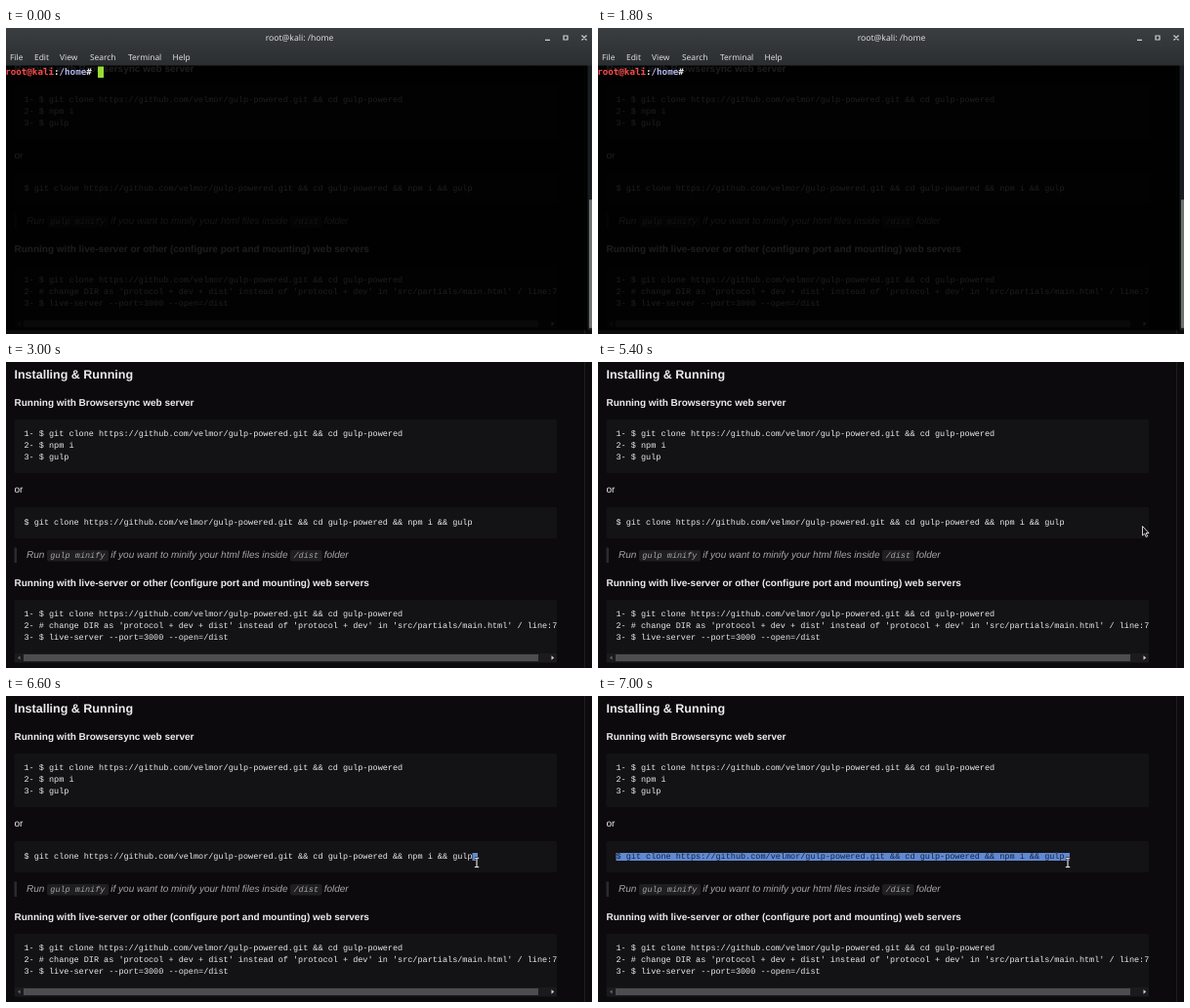
An HTML page that plays this animation: 600x314 px, repeating every 8 s.

```html
<!DOCTYPE html>
<html lang="en">
<head>
<meta charset="utf-8">
<title>Terminal and readme</title>
<style>
  html, body { margin: 0; width: 100%; height: 100%; overflow: hidden; background: #0c0a0d; }
  svg { display: block; }
  text { white-space: pre; text-rendering: geometricPrecision; fill: #ececec; }
  .page text { font: 10px "Liberation Sans", Arial, sans-serif; }
  .page .title { font-size: 12.5px; font-weight: bold; }
  .page .head { font-weight: bold; }
  .page .code { font: 8.5px "Liberation Mono", "Courier New", monospace; }
  .page .quote text { font-style: italic; fill: #a6a5a7; }
  .block { fill: #131214; }
  .chip { fill: #1f1e20; }
  .chrome text { font: 8.4px "Noto Sans", sans-serif; fill: #dcdcdc; }
  .prompt { font: bold 9.2px "DejaVu Sans Mono", monospace; }
</style>
</head>
<body>
<svg width="600" height="314" viewBox="0 0 600 314">
  <defs>
    <linearGradient id="bar" x2="0" y2="1">
      <stop stop-color="#3b3e40"/>
      <stop offset="1" stop-color="#2b2e30"/>
    </linearGradient>
  </defs>

  <g class="page">
    <rect width="600" height="314" fill="#0c0a0d"/>
    <path d="M592.5 0V314" stroke="#1d1d19"/>
    <text class="title" x="8.5" y="17">Installing &amp; Running</text>
    <text class="head" x="8.5" y="45">Running with Browsersync web server</text>
    <rect class="block" x="8.5" y="59" width="555.5" height="55" rx="1.5"/>
    <text class="code" x="18.5" y="76.3">1- $ git clone https://github.com/velmor/gulp-powered.git &amp;&amp; cd gulp-powered</text>
    <text class="code" x="18.5" y="88.3">2- $ npm i</text>
    <text class="code" x="18.5" y="100.3">3- $ gulp</text>
    <text x="8.5" y="134.3">or</text>
    <rect class="block" x="8.5" y="149" width="555.5" height="32" rx="1.5"/>
    <text class="code" x="18.5" y="167">$ git clone https://github.com/velmor/gulp-powered.git &amp;&amp; cd gulp-powered &amp;&amp; npm i &amp;&amp; gulp</text>

    <g class="quote">
      <rect x="8.5" y="190.5" width="2.5" height="15.5" fill="#2b2a2c"/>
      <rect class="chip" x="42" y="193" width="63" height="11.5" rx="2"/>
      <rect class="chip" x="291" y="193" width="32.5" height="11.5" rx="2"/>
      <text x="21" y="201.3">Run</text>
      <text class="code" x="45.3" y="201.3">gulp minify</text>
      <text x="107.3" y="201.3">if you want to minify your html files inside</text>
      <text class="code" x="294.5" y="201.3">/dist</text>
      <text x="325.7" y="201.3">folder</text>
    </g>

    <text class="head" x="8.5" y="230">Running with live-server or other (configure port and mounting) web servers</text>
    <rect class="block" x="8.5" y="244" width="555.5" height="65" rx="1.5"/>
    <svg width="564" height="314">
      <text class="code" x="18.5" y="261.3">1- $ git clone https://github.com/velmor/gulp-powered.git &amp;&amp; cd gulp-powered</text>
      <text class="code" x="18.5" y="273.3">2- # change DIR as 'protocol + dev + dist' instead of 'protocol + dev' in 'src/partials/main.html' / line:7</text>
      <text class="code" x="18.5" y="285.1">3- $ live-server --port=3000 --open=/dist</text>
    </svg>
    <rect x="9" y="299" width="555" height="9" fill="#1b1a1c"/>
    <rect x="18" y="300" width="527" height="7" fill="#4d4c4e"/>
    <path d="M14.5 301.5v4l-2.5-2z" fill="#69686a"/>
    <path d="M558.5 301.3v4.4l2.7-2.2z" fill="#d0d0d0"/>
  </g>

  <g id="selection">
    <rect id="highlight" y="161" height="8" fill="#6189d2"/>
    <svg id="selected" class="page" width="483" height="314">
      <text class="code" x="18.5" y="167" style="fill:#14233f">$ git clone https://github.com/velmor/gulp-powered.git &amp;&amp; cd gulp-powered &amp;&amp; npm i &amp;&amp; gulp</text>
    </svg>
  </g>

  <path id="arrow" d="M2.5.5V10L4.7 8.1 6.2 11.5 7.7 10.8 6.2 7.5H9z" fill="#111" stroke="#e8e8e8" stroke-width=".9"/>
  <g id="beam" fill="none">
    <path d="M-2.2 .8H2.2M0 .8V10M-2.2 10H2.2" stroke="#111" stroke-width="2.4"/>
    <path d="M-2.2 .8H2.2M0 .8V10M-2.2 10H2.2" stroke="#f0f0f0" stroke-width="1.1"/>
  </g>

  <g id="terminal">
    <rect y="38" width="600" height="272" opacity=".88"/>
    <rect x="595.5" y="38" width="4.5" height="272" fill="#1b1e20"/>
    <rect x="597" y="176" width="3" height="132" rx="1" fill="#707272"/>
    <rect width="600" height="38.5" fill="url(#bar)"/>
    <g class="chrome">
      <text x="300.5" y="13.2" text-anchor="middle" style="font-size:8.6px">root@kali: /home</text>
      <text x="4" y="32.8">File</text>
      <text x="29" y="32.8">Edit</text>
      <text x="55" y="32.8">View</text>
      <text x="86" y="32.8">Search</text>
      <text x="125" y="32.8">Terminal</text>
      <text x="170.5" y="32.8">Help</text>
      <path d="M552 12.3H557M571 8H575V12H571ZM589.5 7.5L594.5 12.5M594.5 7.5L589.5 12.5" fill="none" stroke="#d0d0d0" stroke-width="1.2"/>
    </g>
    <text class="prompt" x="-.8" y="48"><tspan fill="#ff4a4a">root@kali</tspan>:<tspan fill="#b3b6ea">/home</tspan>#</text>
    <rect id="caret" x="94" y="39.5" width="6" height="11.5" fill="#98dc36"/>
  </g>
</svg>

<script>
const LOOP = 8000, BLINK = 600, PAGE_AT = 3000;
const el = id => document.getElementById(id);
const show = (id, on) => el(id).setAttribute("visibility", on ? "visible" : "hidden");

// [start ms, pointer shape, x, y]
const pointer = [
  [5400, "arrow", 555, 168],
  [5600, "arrow", 511, 162],
  [5800, "arrow", 485, 162],
  [6000, "beam", 483, 163],
  [6200, "beam", 482, 165.5],
  [6800, "beam", 481, 165.5]
];

function draw(t) {
  show("terminal", t < PAGE_AT);
  show("caret", t < PAGE_AT && Math.floor(t / BLINK) % 2 === 0);

  const step = pointer.filter(p => t >= p[0]).pop();
  for (const shape of ["arrow", "beam"]) show(shape, step && step[1] === shape);
  if (step) el(step[1]).setAttribute("transform", `translate(${step[2]} ${step[3]})`);

  const wholeLine = t >= 6800;
  const left = wholeLine ? 18.5 : 477.5;
  el("highlight").setAttribute("x", left);
  el("highlight").setAttribute("width", 483 - left);
  show("highlight", t >= 6600);
  show("selected", wholeLine);
}

function tick() {
  draw(performance.now() % LOOP);
  requestAnimationFrame(tick);
}
tick();
</script>
</body>
</html>
```
